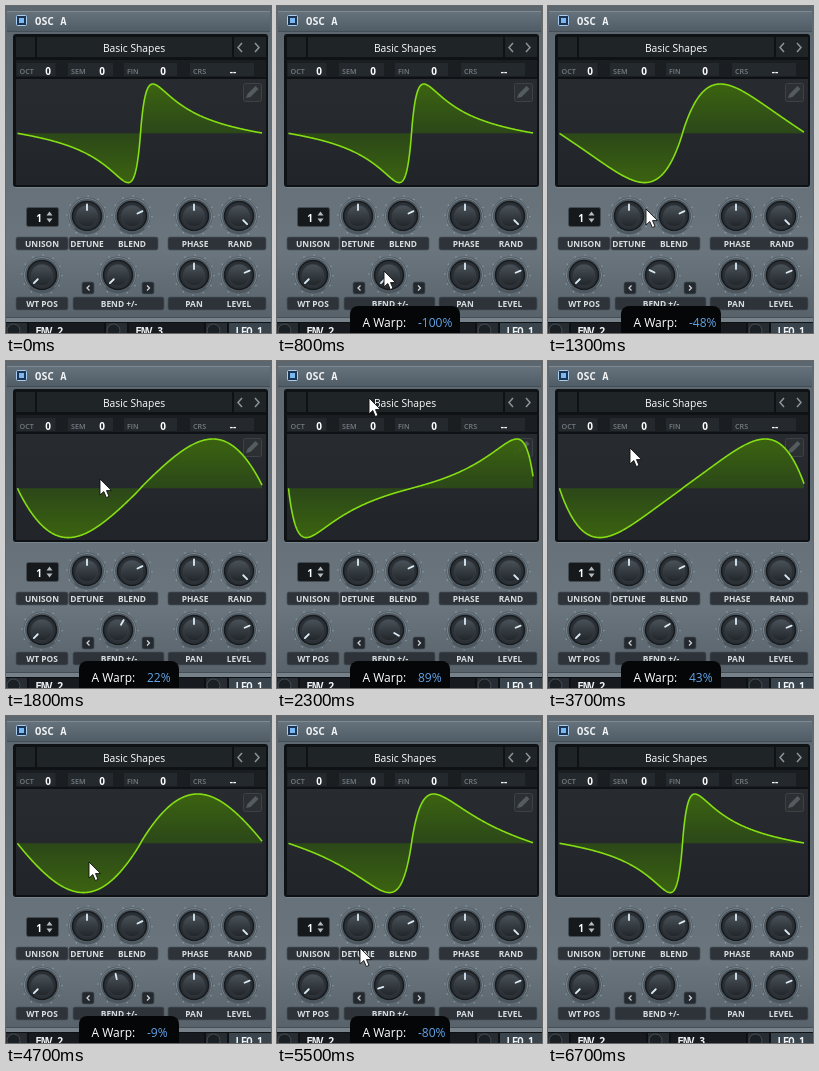
Animation of 265x327 px, one loop 7.8 s. Source, as an HTML page:

```html
<!DOCTYPE html>
<html lang="en">
<head>
<meta charset="utf-8">
<title>Oscillator warp</title>
<style>
html, body { margin: 0; width: 100%; height: 100%; overflow: hidden; background: #5a646c; }
svg { display: block; }
text { font-family: "Open Sans", "Noto Sans", sans-serif; fill: #fff; }
.mono { font-family: "Noto Sans Mono", "DejaVu Sans Mono", monospace; font-weight: 700; font-size: 10.5px; fill: #f1f4f6; }
.tab { letter-spacing: -.9px; }
.label { font-size: 8.4px; font-weight: 700; fill: #d8dde0; text-anchor: middle; }
.dim { font-size: 7.2px; fill: #747c82; font-weight: 600; }
.num { font-size: 10px; font-weight: 700; text-anchor: middle; }
.tip { font-size: 12px; }
</style>
</head>
<body>
<svg id="stage" width="265" height="327" viewBox="0 0 265 327">
  <defs>
    <linearGradient id="body" x1="0" y1="0" x2="0" y2="1">
      <stop offset="0" stop-color="#5c666e"/><stop offset=".55" stop-color="#66717a"/>
      <stop offset=".75" stop-color="#6a757d"/><stop offset="1" stop-color="#545e66"/>
    </linearGradient>
    <linearGradient id="bar" x1="0" y1="0" x2="0" y2="1">
      <stop offset="0" stop-color="#66727c"/><stop offset="1" stop-color="#505c66"/>
    </linearGradient>
    <linearGradient id="cap" x1="0" y1="0" x2="0" y2="1">
      <stop offset="0" stop-color="#4a5259"/><stop offset="1" stop-color="#202529"/>
    </linearGradient>
    <linearGradient id="screen" x1="0" y1="0" x2="0" y2="1">
      <stop offset="0" stop-color="#282c30"/><stop offset="1" stop-color="#212529"/>
    </linearGradient>
    <linearGradient id="glow" gradientUnits="userSpaceOnUse" x1="0" y1="77" x2="0" y2="177">
      <stop offset="0" stop-color="#3d680e"/><stop offset=".5" stop-color="#2c4a17"/>
      <stop offset="1" stop-color="#3d680e"/>
    </linearGradient>
  </defs>
  <g id="panel"></g>
  <path id="fill" fill="url(#glow)" fill-opacity=".93"/>
  <path id="wave" fill="none" stroke="#85dd14" stroke-width="1.6" stroke-linejoin="round"/>
  <g id="tip">
    <rect id="tipBox" x="73" y="300" width="100" height="40" rx="8" fill="#050607"/>
    <text class="tip" x="85.5" y="321">A Warp:</text>
    <text class="tip" id="value" x="141" y="321" style="fill:#62a4e8"></text>
  </g>
  <path id="cursor" d="M0 0V16L3.8 12.5L6.3 18.5L9 17.4L6.5 11.6H11.5Z" fill="#fff" stroke="#111" stroke-width=".9"/>
</svg>
<script>
const LOOP = 7800, STEP = 100;
const LEFT = 11.5, RIGHT = 257.5, EDGE = 256, MID = 127.3, AMP = 49.3;
const $ = id => document.getElementById(id);

// [time, warp percent]
const WARP = [[800, -100], [900, -98], [1300, -48], [1800, 22], [2300, 89], [2500, 100],
  [3200, 100], [3400, 84], [3700, 43], [4000, 14], [4700, -9], [5100, -43],
  [5500, -80], [5900, -98], [6100, -100]];

// [time, x, y]
const MOUSE = [[200, 92, 318], [400, 100, 290], [600, 108, 265], [800, 107, 265], [900, 106, 263],
  [1300, 98, 203], [1800, 94, 118], [2300, 92, 37], [2500, 90, 22], [2800, 88, 5],
  [3200, 85, 9], [3400, 84, 40], [3700, 82, 87], [4000, 82, 119], [4700, 83, 146],
  [5100, 83, 188], [5500, 83, 232], [5900, 83, 252], [6300, 83, 256],
  [6400, 90, 262], [6500, 128, 284], [6600, 178, 312]];

function add(parent, tag, attrs, text) {
  const el = document.createElementNS("http://www.w3.org/2000/svg", tag);
  for (const k in attrs) el.setAttribute(k, attrs[k]);
  if (text) el.textContent = text;
  parent.append(el);
  return el;
}
const panel = $("panel");
const box = (x, y, width, height, fill, more) => add(panel, "rect", { x, y, width, height, fill, ...more });
const line = (d, stroke, width = 1) => add(panel, "path", { d, stroke, "stroke-width": width, fill: "none" });
const label = (x, y, text, cls, more) => add(panel, "text", { x, y, class: cls, ...more }, text);

function knob(x, y, angle) {
  const ring = (r, fill, more) => add(panel, "circle", { cx: x, cy: y, r, fill, ...more });
  ring(17, "none", { stroke: "#4d575f", "stroke-width": 3 });
  ring(20, "none", { stroke: "#a5bccb", "stroke-width": 1.2, "stroke-dasharray": "1.3 9.17", opacity: .65 });
  add(panel, "path", {
    d: `M${x - 12.4} ${y + 12.4}A17.5 17.5 0 1 1 ${x + 12.4} ${y + 12.4}`,
    fill: "none", stroke: "#8c9aa4", "stroke-width": .9, opacity: .75
  });
  ring(15.3, "#171b1e");
  ring(13.7, "#2a3035");
  ring(10.8, "url(#cap)", { stroke: "#394148", "stroke-width": .6 });
  const hand = add(panel, "path", { d: "M0 -6V-11.500", stroke: "#dcecf7", "stroke-width": 1.8, "stroke-linecap": "round" });
  const turn = a => hand.setAttribute("transform", `translate(${x} ${y}) rotate(${a})`);
  turn(angle);
  return turn;
}

function buildDisplay() {
  box(0, 0, 265, 327, "url(#body)");
  box(1, 5, 263, 20, "url(#bar)");
  line("M1 5.5H264", "#7e8991");
  line("M1 25.5H264", "#444e56");
  box(10.5, 9.5, 10, 10, "#1d3550", { stroke: "#a9cdf0", rx: 1 });
  box(13, 12, 5, 5, "#79b8f2");
  label(29, 18.5, "OSC A", "mono");

  box(7, 28, 255, 153, "#0f1214", { rx: 3 });
  line("M9 181.5H260", "#77828a");
  box(10, 31, 19, 20, "#1f2427");
  box(31, 31, 195, 20, "#1f2427");
  box(228, 31, 32, 20, "#1f2427");
  label(128, 46, "Basic Shapes", "", { "font-size": 10.3, "text-anchor": "middle" });
  line("M236 37L232 41.500L236 46M249 37L253 41.500L249 46", "#8d959a", 1.5);

  box(10, 54, 250, 17, "#1a1e21");
  [["OCT", 13.5, 42, 39], ["SEM", 65, 96, 45], ["FIN", 121, 157, 53], ["CRS", 187, 227, 64]]
    .forEach(([name, x, at, w]) => {
      box(x - 3, 57, w, 13, "#24292d");
      label(x, 68, name, "dim");
      label(at, 69, name === "CRS" ? "--" : "0", "num");
    });

  box(10, 73, 250, 106, "url(#screen)");
  box(237.5, 77.5, 18, 18, "#2c3033", { rx: 2, stroke: "#3c4245" });
  add(panel, "path", { d: "M240 92L241.500 88L249.500 80L252.500 83L244.500 91Z", fill: "#555c60" });
}

function buildControls() {
  const plate = (x, y, w) => box(x, y, w, 13, "#2d3338", { rx: 2, stroke: "#495159", "stroke-width": .7 });
  [[10, 231, 52], [63, 231, 89], [162, 231, 98], [10, 291, 52], [67, 291, 91], [162, 291, 98]]
    .forEach(a => plate(...a));
  [["UNISON", 36, 240.5], ["DETUNE", 81, 240.5], ["BLEND", 126, 240.5], ["PHASE", 189, 240.5],
   ["RAND", 234, 240.5], ["WT POS", 36, 300.5], ["BEND +/-", 113, 300.5], ["PAN", 188, 300.5],
   ["LEVEL", 233, 300.5]].forEach(([s, x, y]) => label(x, y, s, "label"));

  box(20.5, 201.5, 32, 19, "#15191c", { rx: 2, stroke: "#434c53" });
  label(33, 215.5, "1", "num");
  add(panel, "path", { d: "M40.500 209.500L43.500 205.500L46.500 209.500ZM40.500 212.500L43.500 216.500L46.500 212.500Z", fill: "#b4bbc0" });

  knob(81, 210, 0); knob(126, 210, 65); knob(188, 210, 0); knob(233, 210, 135);
  knob(36, 269, -135); knob(188, 269, 0); knob(233, 269, 68);

  [76, 136].forEach(x => box(x, 276, 12, 12, "#23292e", { rx: 2, stroke: "#454e55", "stroke-width": .7 }));
  line("M83.500 279.500L81 282L83.500 284.500M141 279.500L143.500 282L141 284.500", "#d5dade", 1.2);

  line("M0 311.500H265", "#454e55");
  box(0, 312, 265, 4, "#76818a");
  box(0, 316, 265, 11, "#0e1114");
  ["ENV 2", "ENV 3", "LFO 1"].forEach((s, i) => {
    const x = i * 100;
    box(x, 317, 21, 10, "#262c31");
    add(panel, "circle", { cx: x + 7.5, cy: 324.5, r: 6.5, fill: "#1b2024", stroke: "#434b52" });
    box(x + 23, 317, 75, 10, i === 2 ? "#39444d" : "#171b1f");
    label(x + 29.5, 328.5, s, "mono tab");
  });
}

function at(table, t) {
  let i = 0;
  while (i < table.length - 2 && t >= table[i + 1][0]) i++;
  const a = table[i], b = table[i + 1];
  const k = Math.min(1, Math.max(0, (t - a[0]) / (b[0] - a[0])));
  return a.slice(1).map((v, j) => v + (b[j + 1] - v) * k);
}

// Each half cycle is a half sine whose phase is pulled towards or away from the centre.
function drawWave(warp) {
  const peak = .5 + .4 * warp / 100, bend = peak / (1 - peak);
  const mid = (LEFT + RIGHT) / 2, half = (RIGHT - LEFT) / 2;
  let d = "";
  for (let x = LEFT; x <= EDGE; x += .5) {
    const u = Math.abs(x - mid) / half;
    const a = u ** .95, b = (bend * (1 - u)) ** .95;
    const y = MID - Math.sign(x - mid) * AMP * Math.sin(Math.PI * a / (a + b));
    d += `${d ? "L" : "M"}${x} ${y.toFixed(2)}`;
  }
  $("wave").setAttribute("d", d);
  $("fill").setAttribute("d", d + `V${MID}H${LEFT}Z`);
}

buildDisplay();
buildControls();
const turnBend = knob(112, 269, -135);
const show = (id, on) => $(id).setAttribute("visibility", on ? "visible" : "hidden");
let last = -1;

function render(now) {
  const t = Math.floor(now % LOOP / STEP) * STEP;
  if (t === last) return;
  last = t;
  const [warp] = at(WARP, t), [x, y] = at(MOUSE, t);
  const percent = Math.round(warp) || 0;
  drawWave(warp);
  turnBend(warp * 1.35);
  $("value").textContent = percent + "%";
  $("tipBox").setAttribute("width", percent === -100 ? 110 : 100);
  show("tip", t >= 800 && t < 6400);
  $("cursor").setAttribute("transform", `translate(${Math.round(x)} ${Math.round(y)})`);
  show("cursor", t >= 200 && t < 6700);
}

const start = performance.now();
function tick() {
  render(performance.now() - start);
  requestAnimationFrame(tick);
}
tick();
</script>
</body>
</html>
```
